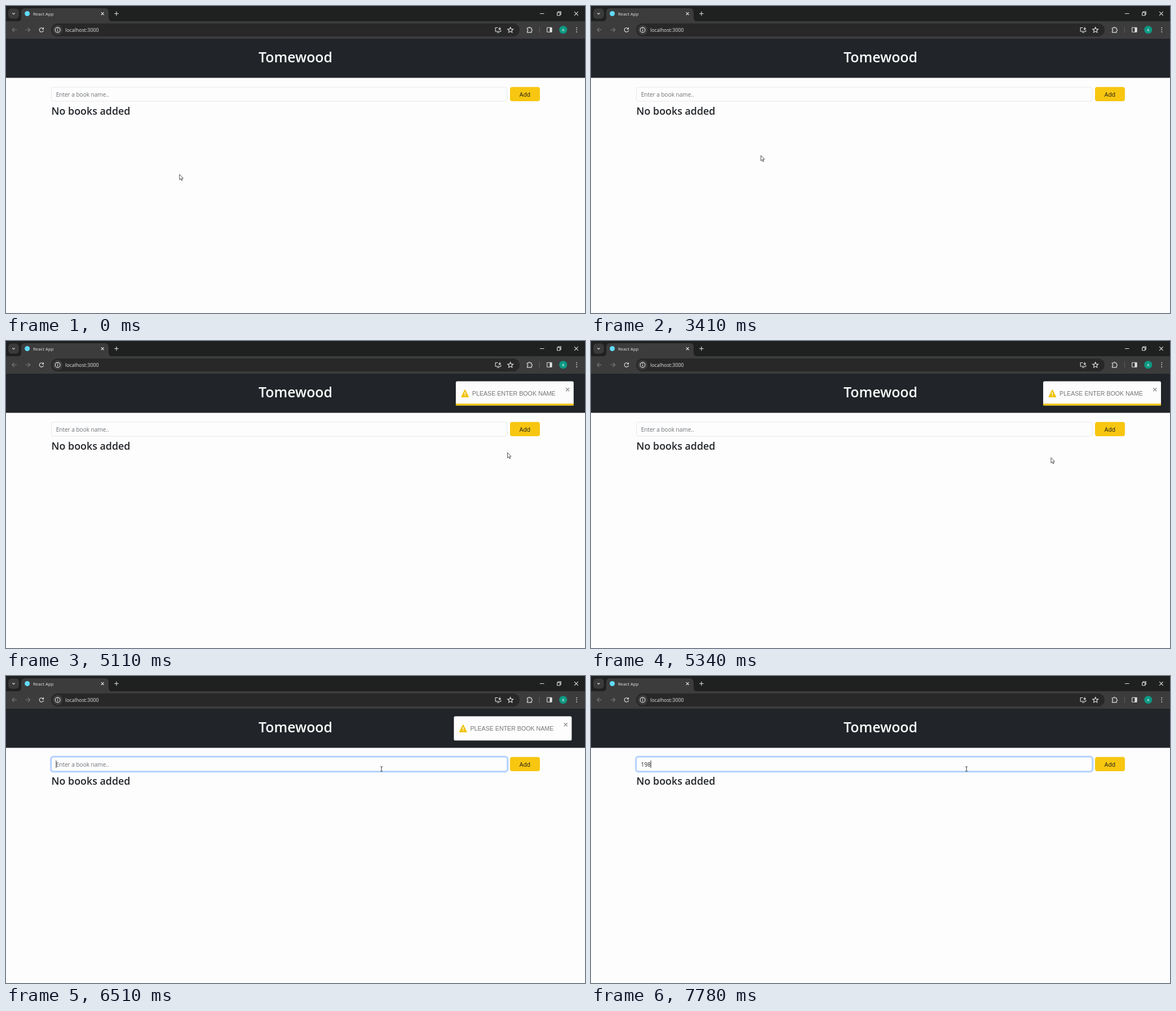
Write an HTML page that moves like this. It is 1027 by 545 pixels and loops after 8 s.

```html
<!DOCTYPE html>
<html lang="en">
<head>
<meta charset="utf-8">
<title>React App</title>
<style>
  html, body { margin: 0; width: 100%; height: 100%; overflow: hidden; background: #fdfdfd; }
  svg { display: block; width: 1027px; height: 545px; }
  text { font-family: "Open Sans", "Noto Sans", sans-serif; white-space: pre; }
  .line { fill: none; stroke: #e2e3e3; stroke-width: 1.1; }
  .dim { stroke: #7b7b7c; }
  .toast { font-family: "Liberation Sans", Arial, sans-serif; }
</style>
</head>
<body>
<svg viewBox="0 0 1027 545">
  <rect width="1027" height="545" fill="#fdfdfd"/>

  <!-- tab strip -->
  <rect width="1027" height="28" fill="#1f2020"/>
  <rect x="4" y="4.5" width="19" height="18" rx="6" fill="#3a3a3b"/>
  <path class="line" d="M11.3 12.4l2.2 2.2 2.2-2.2"/>
  <path d="M20 27.5q7 0 7-7V11q0-7 7-7h141q7 0 7 7v9.500q0 7 7 7z" fill="#3c3c3d"/>
  <circle cx="37.700" cy="13.500" r="4.500" fill="#61dafb"/>
  <text x="48" y="16.500" font-size="7.800" fill="#e6e6e6">React App</text>
  <path class="line" d="M168.800 11.200l4.800 4.800m0-4.800l-4.800 4.800M192.200 13.500h7.400m-3.700-3.700v7.400"/>
  <path class="line" stroke-width="1" d="M947 13.500h7.500M1008.200 10.200l6.600 6.600m0-6.600l-6.600 6.600"/>
  <path class="line" d="M977.700 11.700h5v5h-5zM979.300 11.500v-1.500h5v5h-1.500"/>

  <!-- toolbar -->
  <rect y="27" width="1027" height="31" fill="#3c3c3d"/>
  <path class="line dim" d="M19 42.300h-8m3.700-3.700l-3.700 3.700 3.700 3.700M34.700 42.300h8m-3.700-3.700l3.700 3.700-3.700 3.700"/>
  <path class="line" d="M66 40.200a3.700 3.700 0 1 0 .600 3.100M66.500 38.300v2.600h-2.700"/>
  <rect x="80" y="31" width="831" height="23" rx="11.500" fill="#282829"/>
  <circle cx="91.600" cy="42.500" r="8.700" fill="#3c3c3d"/>
  <circle class="line" cx="91.600" cy="42.500" r="4.400"/>
  <path class="line" d="M91.600 42v2.800m0-5v1.200"/>
  <text x="105" y="45.700" font-size="8.830" fill="#e6e6e6">localhost:3000</text>
  <path class="line" d="M872.500 38.500h-4.300v6.500h9.600v-2M870.800 47h4.500M875.800 37.500v4.500m-2-2l2 2 2-2"/>
  <path class="line" d="M894.700 37.700l1.400 3.200 3.500.300-2.600 2.300.800 3.400-3.100-1.800-3.100 1.800.800-3.400-2.600-2.300 3.500-.300z"/>
  <path class="line" d="M924.500 39h2.400a1.400 1.400 0 0 1 2.800 0h2.400v2.500a1.400 1.400 0 0 1 0 2.800v2.600h-7.600v-2.600a1.400 1.400 0 0 0 0-2.800z"/>
  <path d="M946.300 37.500v10" stroke="#626264" stroke-width="1"/>
  <rect class="line" x="959.700" y="38.300" width="8.400" height="8" rx=".8"/>
  <rect x="964.500" y="38.500" width="3.500" height="7.600" fill="#e2e3e3"/>
  <circle cx="988.300" cy="42.300" r="7" fill="#0c9983"/>
  <text x="988.300" y="44.800" font-size="6.500" fill="#fff" text-anchor="middle">A</text>
  <g fill="#e2e3e3">
    <circle cx="1012.300" cy="38.700" r=".9"/><circle cx="1012.300" cy="42.300" r=".9"/><circle cx="1012.300" cy="45.900" r=".9"/>
  </g>

  <!-- page -->
  <rect y="58" width="1027" height="69.500" fill="#212529"/>
  <text x="513.500" y="100.300" font-size="24.800" font-weight="600" fill="#fdfdfd" text-anchor="middle">Tomewood</text>
  <rect id="ring" x="79.200" y="142.700" width="811" height="27.600" rx="5" fill="none" stroke="#0d6efd" stroke-opacity=".25" stroke-width="2.600"/>
  <rect id="field" x="80.500" y="144" width="808.300" height="25" rx="3.800" fill="#fdfdfd" stroke-width=".8"/>
  <text id="hint" x="88.700" y="160.600" font-size="10.040" fill="#6b7075">Enter a book name..</text>
  <text id="typed" x="88.700" y="160.600" font-size="10.040" fill="#212529"></text>
  <rect id="caret" y="150" width=".9" height="13.300" fill="#212529"/>
  <rect id="button" x="894" y="143.700" width="53" height="25.400" rx="4"/>
  <text x="920.500" y="160.700" font-size="10.400" fill="#1a1a1a" text-anchor="middle">Add</text>
  <text x="80.500" y="192.500" font-size="17.850" font-weight="600" fill="#212529">No books added</text>

  <!-- warning toast -->
  <g id="toast">
    <rect x="805" y="71.500" width="209" height="43" rx="2.600" fill="#fdfdfd" style="filter: drop-shadow(0 .6px 3px rgba(0,0,0,.12))"/>
    <path d="M821.300 87.200l5.900 11.900h-11.800z" fill="#f1c40f" stroke="#f1c40f" stroke-width="1.800" stroke-linejoin="round"/>
    <path d="M821.300 90.800v4.200m0 1.600v1.500" stroke="#fdfdfd" stroke-width="1.500"/>
    <text class="toast" x="834" y="96.800" font-size="10.650" fill="#757575">PLEASE ENTER BOOK NAME</text>
    <path d="M1000.300 83.200l6 6m0-6l-6 6" stroke="#8d8d8d" stroke-width="1.300"/>
    <rect id="bar" x="805" y="111.200" height="3.300" fill="#f1c40f"/>
  </g>

  <!-- pointers -->
  <g stroke="#222" stroke-width=".8" stroke-linejoin="round" fill="#fff">
    <path id="arrow" d="M.3 0v9.400l2.100-1.900 1.500 3.400 1.500-.700-1.500-3.200 2.900-.200z"/>
    <path id="hand" d="M-.8 7V.9q0-.9.800-.9t.8.900v3.700q.2-.8 1-.7.800.1.800.9.200-.6.900-.5.800.1.800.9.200-.5.800-.4.700.1.700.9v3q0 3.200-3.300 3.200-2.300 0-3.300-1.700L-3 7.500q-.500-.900.100-1.300.700-.400 1.300.200z"/>
    <path id="beam" fill="none" stroke-width=".9" d="M-2-4.200q2 0 2 .9v6.600q0 .9-2 .9M2-4.200q-2 0-2 .9m0 6.600q0 .9 2 .9"/>
  </g>
</svg>
<script>
const LOOP = 8000, SCALE = 0.653;
const el = Object.fromEntries([...document.querySelectorAll("[id]")].map(n => [n.id, n]));

// time, x, y of the pointer's hot spot
const path = [
  [0, 307.5, 299], [40, 307.5, 299], [100, 290, 275], [1820, 290, 275],
  [1840, 289, 274], [1855, 289, 274], [1870, 293, 267], [2410, 293, 267],
  [2470, 300, 266], [3410, 300, 266], [3440, 330, 246], [3940, 330, 246],
  [3970, 620, 188], [4270, 620, 188], [4330, 740, 178], [4400, 880, 160],
  [4460, 930, 152], [4760, 930, 152], [4850, 926, 156], [4950, 910, 176],
  [5040, 897, 188], [5110, 889.5, 198], [5200, 868, 207], [5300, 830, 209],
  [5500, 760, 200], [5700, 695, 180], [5880, 667, 165], [5910, 666, 165],
  [LOOP, 666, 165]
];
const keys = [[7280, "1"], [7510, "19"], [7780, "198"]];
const ENTER = 4740, SHOWN = 5440, EXIT = 6440, GONE = 7140;
const FOCUS = 6390, BLINK = 520;

const clamp = v => Math.max(0, Math.min(1, v));
const ramp = (t, a, b) => clamp((t - a) / (b - a));
const lerp = (a, b, p) => a + (b - a) * p;
const mix = (a, b, p) => `rgb(${a.map((v, i) => Math.round(lerp(v, b[i], p)))})`;

function bezier(x1, y1, x2, y2) {
  const at = (a, b, s) => 3 * (1 - s) ** 2 * s * a + 3 * (1 - s) * s * s * b + s ** 3;
  return x => {
    let lo = 0, hi = 1;
    for (let i = 0; i < 24; i++) {
      const mid = (lo + hi) / 2;
      if (at(x1, x2, mid) < x) lo = mid; else hi = mid;
    }
    return at(y1, y2, (lo + hi) / 2);
  };
}
const ease = bezier(0.25, 0.1, 0.25, 1);
const easeOut = bezier(0.215, 0.61, 0.355, 1);
const easeInOut = bezier(0.42, 0, 0.58, 1);

// stops are [progress, value]; the easing applies between stops
function track(stops, p, fn) {
  let i = 1;
  while (i < stops.length - 1 && p > stops[i][0]) i++;
  const [a, va] = stops[i - 1], [b, vb] = stops[i];
  return lerp(va, vb, fn(ramp(p, a, b)));
}
const bounceIn = [[0, 3000], [0.6, -25], [0.75, 10], [0.9, -5], [1, 0]];
const bounceOut = [[0, 0], [0.2, -20], [1, 2000]];

function drawToast(t) {
  const visible = t >= ENTER && t < GONE;
  el.toast.style.display = visible ? "" : "none";
  if (!visible) return;
  const pin = ramp(t, ENTER, SHOWN), pout = ramp(t, EXIT, GONE);
  const shift = t < EXIT ? track(bounceIn, pin, easeOut) : track(bounceOut, pout, ease);
  const alpha = t < EXIT ? easeOut(clamp(pin / 0.6)) : 1 - ease(ramp(pout, 0.2, 1));
  el.toast.setAttribute("transform", `translate(${shift * SCALE} 0)`);
  el.toast.setAttribute("opacity", alpha);
  el.bar.setAttribute("width", 209 * (1 - ramp(t, SHOWN, EXIT)));
}

function drawField(t) {
  const focus = easeInOut(ramp(t, FOCUS, FOCUS + 120));
  el.ring.setAttribute("opacity", focus);
  el.field.setAttribute("stroke", mix([222, 226, 230], [134, 183, 254], focus));
  let text = "", since = FOCUS;
  for (const [at, value] of keys) if (t >= at) { text = value; since = at; }
  if (el.typed.textContent !== text) el.typed.textContent = text;
  el.hint.style.display = text ? "none" : "";
  const lit = t >= FOCUS && Math.floor((t - since) / BLINK) % 2 === 0;
  el.caret.style.display = lit ? "" : "none";
  el.caret.setAttribute("x", 88.5 + (text ? el.typed.getComputedTextLength() : 0));
}

function drawPointer(t) {
  let i = 1;
  while (i < path.length - 1 && t > path[i][0]) i++;
  const [a, xa, ya] = path[i - 1], [b, xb, yb] = path[i];
  const p = ramp(t, a, b), x = lerp(xa, xb, p), y = lerp(ya, yb, p);
  const inRow = y >= 144 && y <= 169;
  const kind = inRow && x >= 894 && x <= 947 ? "hand" : inRow && x >= 80 && x <= 889 ? "beam" : "arrow";
  for (const name of ["arrow", "hand", "beam"]) el[name].style.display = name === kind ? "" : "none";
  el[kind].setAttribute("transform", `translate(${x} ${y})`);
}

function draw(t) {
  const hover = easeInOut(ramp(t, 4415, 4510)) - easeInOut(ramp(t, 4915, 5065));
  el.button.setAttribute("fill", mix([247, 198, 16], [248, 206, 50], hover));
  drawField(t);
  drawToast(t);
  drawPointer(t);
}

const start = performance.now();
function tick() {
  draw((performance.now() - start) % LOOP);
  requestAnimationFrame(tick);
}
tick();
</script>
</body>
</html>
```
